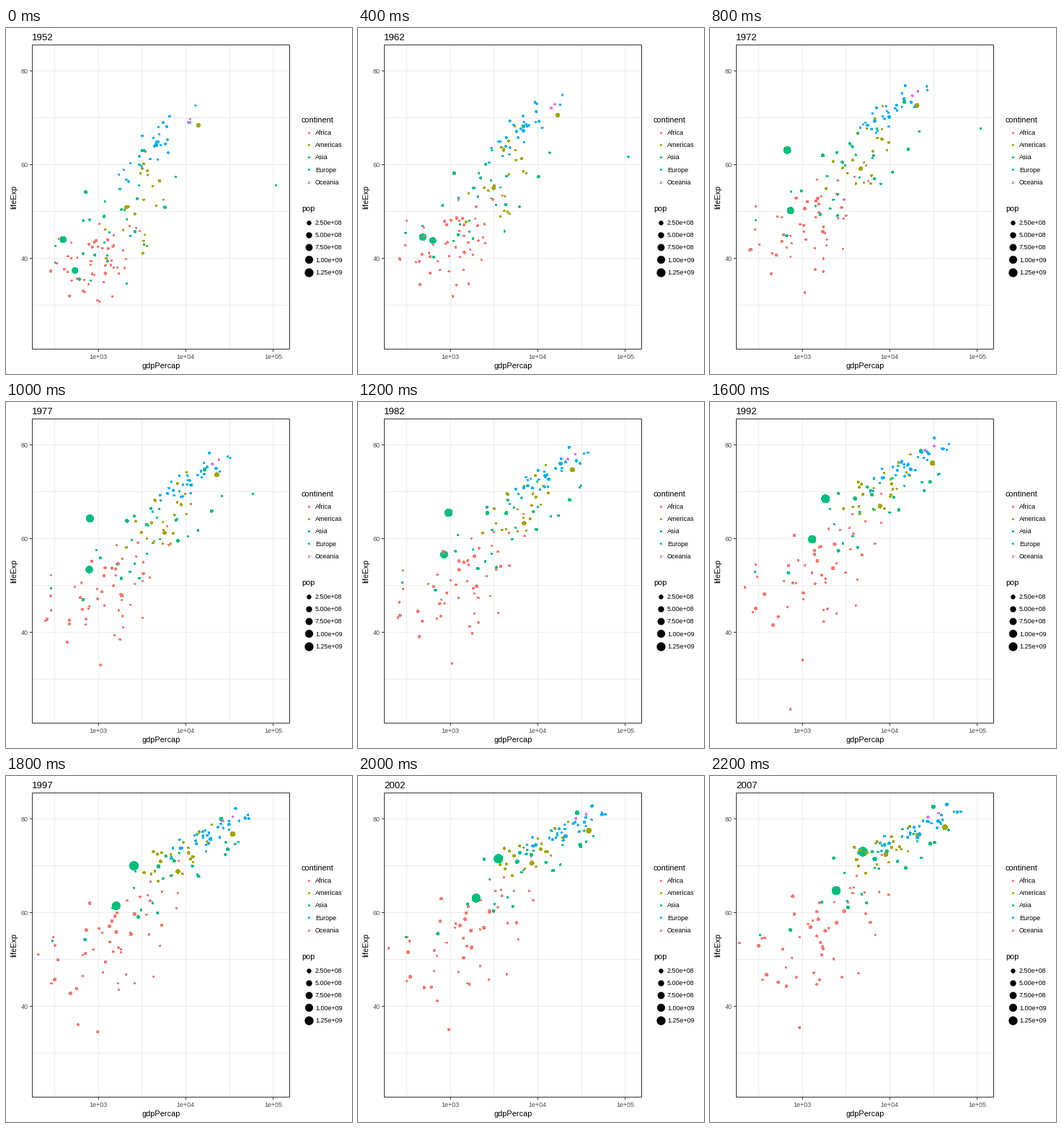
A matplotlib script that plays this animation: 480x480 px, repeating every 2400 ms.

```python
import numpy as np
import matplotlib.pyplot as plt
from matplotlib.animation import FuncAnimation
from matplotlib.patches import Rectangle

SIZE, DPI = 480, 72
YEARS = np.arange(1952, 2008, 5)
T = (YEARS - 1952) / 55
EASE = 1 - (1 - T) ** 1.5
COLORS = {"Africa": "#F8766D", "Americas": "#A3A500", "Asia": "#00BF7D",
          "Europe": "#00B0F6", "Oceania": "#E76BF3"}

# Per continent: count, population range (millions), then for first and last year:
# mean log gdp, its spread, mean life, life per log gdp, life spread
CROWD = {
    "Africa": (50, (1, 80), (3.00, .27, 39.3, 5, 4.3), (3.20, .40, 55.0, 9, 7.0)),
    "Americas": (22, (1, 50), (3.48, .20, 52.5, 18, 6.0), (3.92, .25, 73.3, 7, 2.2)),
    "Asia": (28, (1, 150), (3.17, .36, 47.0, 10, 7.0), (3.80, .48, 70.5, 10, 3.5)),
    "Europe": (29, (2, 80), (3.70, .23, 64.5, 17, 2.5), (4.35, .24, 77.6, 9, 1.1)),
    "Oceania": (2, (4, 20), (4.01, .02, 69.2, 5, 0.2), (4.47, .07, 80.7, 5, 0.3)),
}

# Countries that stand out: continent, population, (year, gdp, life) along the way
LEADERS = [
    ("Asia", 1319, [(1952, 400, 44), (1962, 488, 44.5), (1972, 677, 63.1),
                    (1982, 962, 65.5), (2007, 4959, 73)]),
    ("Asia", 1110, [(1952, 547, 37.4), (1982, 856, 56.6), (2007, 2452, 64.7)]),
    ("Asia", 127, [(1952, 3217, 63), (1972, 14779, 73.4), (2007, 31656, 82.6)]),
    ("Asia", 3, [(1952, 108382, 55.6), (1972, 109348, 67.7),
                 (1982, 31354, 71.3), (2007, 47307, 77.6)]),
    ("Americas", 301, [(1952, 13990, 68.4), (1982, 25010, 74.7),
                       (2007, 42952, 78.2)]),
    ("Americas", 190, [(1952, 2109, 50.9), (1982, 7031, 63.3), (2007, 9066, 72.4)]),
    ("Africa", 9, [(1952, 493, 40), (1987, 848, 44), (1992, 737, 23.6),
                   (1997, 590, 36.1), (2007, 863, 46.2)]),
]


def people(millions):
    return millions * .4 ** (1 - T)


def leader(millions, stops):
    year, gdp, life = np.array(stops, float).T
    return (np.interp(YEARS, year, np.log10(gdp)),
            np.interp(YEARS, year, life), people(millions))


def drift(rng):
    """Slow wander between two normal draws that keeps the spread steady."""
    a, b = np.clip(rng.normal(size=2), -2, 2)
    return a * np.cos(T) + b * np.sin(T)


def crowd(rng, count, pop, first, last):
    mean, spread, level, slope, noise = (a + (b - a) * EASE
                                         for a, b in zip(first, last))
    for _ in range(count):
        dx = spread * drift(rng)
        life = level + slope * dx + noise * drift(rng)
        yield mean + dx, life, people(np.exp(rng.uniform(*np.log(pop))))


def radius(millions):
    size = 1 + 5 * np.sqrt(np.asarray(millions) / 1319)
    return .375 * (2.845 * size + .945)


def px(log_gdp):
    return 127.7 + 121.4 * (log_gdp - 3)


def py(life):
    return 59.5 + 6.5 * (80 - life)


rng = np.random.default_rng(12)
tracks = [leader(pop, stops) for _, pop, stops in LEADERS]
tints = [COLORS[name] for name, *_ in LEADERS]
for name, rule in CROWD.items():
    tracks += crowd(rng, *rule)
    tints += [COLORS[name]] * rule[0]
tracks = np.array(tracks)

plt.rcParams["font.family"] = "Liberation Sans"
fig = plt.figure(figsize=(SIZE / DPI, SIZE / DPI), dpi=DPI, facecolor="white")
ax = fig.add_axes((0, 0, 1, 1))
ax.set(xlim=(0, SIZE), ylim=(SIZE, 0))
ax.axis("off")


def line(xs, ys, color):
    ax.plot(xs, ys, color=color, lw=1, snap=False, solid_capstyle="butt", zorder=1)


def label(x, y, text, size=9, color="black", **kw):
    return ax.text(x, y, text, fontsize=size, color=color, **kw)


def areas(r):
    # Aliased edges fill every touched pixel, so trim half a pixel.
    return (2 * np.asarray(r) - 1) ** 2


def dots(x, y, r, color, **kw):
    return ax.scatter(x, y, s=areas(r), c=color, linewidths=0,
                      antialiased=False, **kw)


def mid(v):
    """Centre of the pixel that holds v."""
    return np.floor(v) + .5


for g in np.arange(2.5, 5.1, .5):
    line([mid(px(g) + .3)] * 2, [24, 445], "#EBEBEB")
for e in range(30, 81, 10):
    line([37, 393], [py(e)] * 2, "#EBEBEB")
for g in (3, 4, 5):
    line([mid(px(g) + .3)] * 2, [446, 449], "#333333")
    label(px(g), 459, f"1e+0{g}", color="#4D4D4D", ha="center")
for e in (40, 60, 80):
    line([33, 36], [py(e)] * 2, "#333333")
    label(31, py(e) + 3.5, str(e), color="#4D4D4D", ha="right")

panel = Rectangle((36.5, 23.5), 357, 422, fill=False, ec="#333333", lw=1,
                  snap=False, zorder=4)
ax.add_patch(panel)
label(215.5, 472.5, "gdpPercap", 11, ha="center")
label(11.5, 234.5, "lifeExp", 11, rotation=90, ha="center", va="center")
title = label(36, 17, "", 13.2)

label(410, 131, "continent", 11)
for i, (name, color) in enumerate(COLORS.items()):
    y = 144.5 + 17.28 * i
    dots([419.5], [y], 2.1, color)
    label(429, y + 3.3, name)
label(410, 254, "pop", 11)
for i in range(5):
    y, millions = 269.5 + 17.28 * i, 250 * (i + 1)
    dots([419.5], [y], radius(millions), "black")
    label(429, y + 3.3, f"{millions * 1e6:.2e}")

bubbles = dots(np.zeros(len(tints)), np.zeros(len(tints)), 1, tints, zorder=3)
bubbles.set_clip_path(panel)


def update(i):
    gdp, life, pop = tracks[:, :, i].T
    bubbles.set_offsets(np.column_stack([px(gdp), py(life)]))
    bubbles.set_sizes(areas(radius(pop)))
    title.set_text(str(YEARS[i]))
    return bubbles, title


anim = FuncAnimation(fig, update, frames=len(YEARS), interval=200,
                     repeat=True, repeat_delay=0)
plt.show()
```
